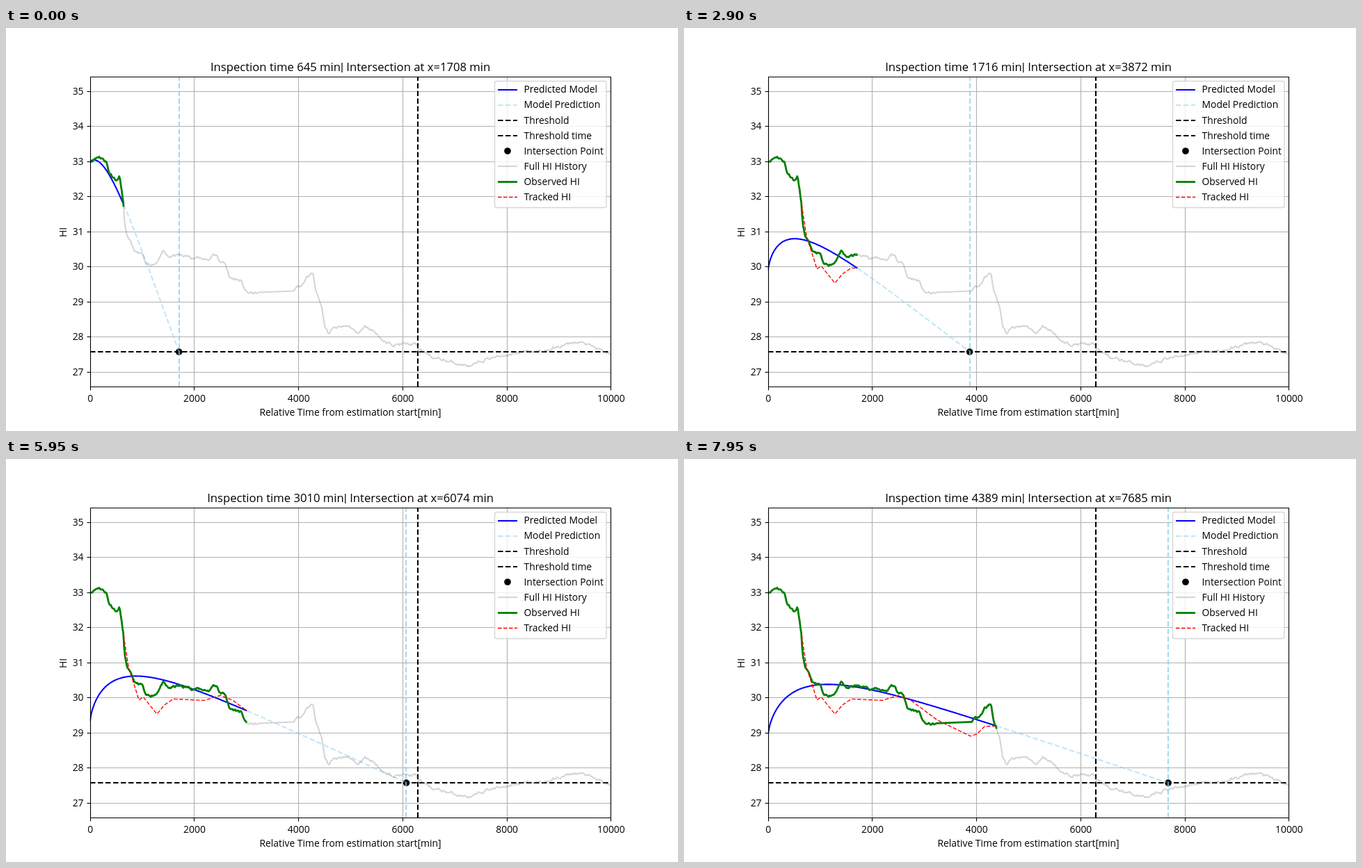
An HTML page with a canvas that plays this animation: 966 by 580 pixels, repeating every 8000 ms.

```html
<!DOCTYPE html>
<html lang="en">
<head>
<meta charset="utf-8">
<title>HI prediction</title>
<style>
html, body { margin: 0; width: 100%; height: 100%; overflow: hidden; background: #fff; }
canvas { display: block; }
</style>
</head>
<body>
<canvas id="c" width="966" height="580"></canvas>
<script>
const ctx = document.getElementById('c').getContext('2d');
const FONT = '"Open Sans", "Noto Sans", sans-serif';
const BOX = { l: 120.75, r: 869.4, t: 69.6, b: 516.2 };
const THRESHOLD = 27.57, THRESHOLD_TIME = 6295;
const STEP = 50, FRAMES = 160;
const GAP = { from: 3245, to: 3888, frame: 132 };
const SKY = a => `rgba(135,206,235,${a})`;
const GREY = 'rgba(128,128,128,.33)';

const px = x => BOX.l + x * (BOX.r - BOX.l) / 10000;
const py = v => 494.85 - (v - 27) * 50.5;
const crisp = x => Math.floor(x + 0.5) + 0.5;

function lerp(points, x) {
  let i = 1;
  while (i < points.length - 1 && points[i][0] < x) i++;
  const [x0, y0] = points[i - 1], [x1, y1] = points[i];
  const k = Math.min(1, Math.max(0, (x - x0) / (x1 - x0)));
  return y0 + (y1 - y0) * k;
}

// Turning points of the health indicator: minute, value
const trend = [
  [0, 33], [170, 33.15], [315, 33], [360, 32.7], [520, 32.45], [565, 32.6], [645, 31.77],
  [662, 31.2], [720, 30.83], [870, 30.4], [1005, 30.35], [1070, 30.02], [1260, 30.1],
  [1400, 30.43], [1500, 30.25], [1675, 30.33], [2300, 30.2], [2360, 30.35], [2445, 30.34],
  [2480, 30.15], [2605, 30.08], [2675, 29.68], [2890, 29.6], [3010, 29.25], [GAP.from, 29.23],
  [GAP.to, 29.29], [4110, 29.55], [4150, 29.72], [4280, 29.82], [4330, 29.35], [4450, 28.84],
  [4510, 28.33], [4585, 28.1], [4650, 28.23], [4980, 28.3], [5130, 28.09], [5280, 28.28],
  [5425, 28.2], [5700, 27.8], [6260, 27.78], [6300, 27.65], [6600, 27.4], [7325, 27.14],
  [7600, 27.36], [8200, 27.55], [8700, 27.58], [9300, 27.84], [9500, 27.81], [10000, 27.48]];

// Adds seeded, slowly wandering noise; the gap without samples stays straight
function roughen(points, step = 16) {
  let seed = 11, drift = 0;
  const random = () => (seed = seed * 16807 % 2147483647) / 2147483647;
  const out = [];
  for (let x = 0; x <= 10000; x += step) {
    drift = drift * 0.75 + (random() - 0.5) * 0.06;
    if (x < GAP.from || x > GAP.to) out.push([x, lerp(points, x) + drift]);
  }
  return out;
}
const history = roughen(trend);

// Model value at each inspection time
const tracked = [
  [645, 31.77], [740, 30.86], [830, 30.45], [940, 29.93], [1020, 30.02], [1285, 29.53],
  [1430, 29.79], [1600, 29.96], [2200, 29.92], [2500, 30.06], [2745, 29.92], [3240, 29.37],
  [GAP.to, 28.9], [4010, 28.96], [4160, 29.18], [4389, 29.19]];

// Where the model meets the threshold for each inspection time
const crossing = [
  [645, 1708], [930, 1570], [1091, 1763], [1716, 3872], [2291, 6146], [2560, 7500],
  [2707, 7900], [2745, 6793], [3240, 5450], [3905, 5813], [4290, 7800], [4389, 7685]];

const sampled = [[0, 645], [26, 1091], [58, 1716], [81, 2291], [105, 2745], [133, 3275], [159, 3759]];
const inspection = frame => Math.round(lerp(sampled, frame)) + (frame < GAP.frame ? 0 : 630);

const startValue = [[1763, 32.08], [2500, 30.8], [3872, 29.88], [6146, 29.3], [7685, 28.95]];

// y = y0 + c rise(x) - b x, through the inspection and crossing points
function fitModel(now, cross) {
  const y0 = lerp(startValue, cross) + Math.max(0, 1091 - now) * 0.00206;
  const tau = 240 + 0.043 * cross;
  const power = Math.max(0.75, 1.2 - 0.000115 * cross);
  const rise = x => 1 - Math.exp(-Math.pow(x / tau, power));
  const dNow = lerp(tracked, now) - y0, dCross = THRESHOLD - y0;
  const det = now * rise(cross) - cross * rise(now);
  const c = (now * dCross - cross * dNow) / det;
  const b = (rise(now) * dCross - rise(cross) * dNow) / det;
  return x => y0 + c * rise(x) - b * x;
}

const upTo = (points, x) => [...points.filter(p => p[0] < x), [x, lerp(points, x)]];

function sample(f, from, to, n = 160) {
  return Array.from({ length: n + 1 }, (_, i) => {
    const x = from + (to - from) * i / n;
    return [x, f(x)];
  });
}

// Dash lengths sit on half pixels
const dashes = width => [3.7, 1.6].map(k => Math.floor(k * width) + 0.5);

function stroke(points, color, width, dashed) {
  ctx.strokeStyle = color;
  ctx.lineWidth = width;
  ctx.lineJoin = 'round';
  ctx.setLineDash(dashed ? dashes(width) : []);
  ctx.beginPath();
  points.forEach(([x, y]) => ctx.lineTo(x, y));
  ctx.stroke();
  ctx.setLineDash([]);
}

const plot = (points, ...style) => stroke(points.map(([x, v]) => [px(x), py(v)]), ...style);

function dot(x, y) {
  ctx.fillStyle = '#000';
  ctx.beginPath();
  ctx.arc(x, y, 4.86, 0, 2 * Math.PI);
  ctx.fill();
}

function text(s, x, y, align = 'left', size = 13.89, family = FONT) {
  ctx.font = `${size}px ${family}`;
  ctx.textAlign = align;
  ctx.fillStyle = '#000';
  ctx.fillText(s, x, y);
  return ctx.measureText(s).width;
}

function drawTitle(now, cross) {
  const size = 16.67;
  const parts = [
    [`Inspection time ${now} min`, FONT],
    ['|', 'Roboto, sans-serif'],
    [` Intersection at x=${cross} min`, FONT]];
  const total = parts.reduce((w, [s, family]) => {
    ctx.font = `${size}px ${family}`;
    return w + ctx.measureText(s).width;
  }, 0);
  let x = (BOX.l + BOX.r) / 2 - total / 2;
  for (const [s, family] of parts) x += text(s, x, 61.5, 'left', size, family);
}

const ticksX = Array.from({ length: 6 }, (_, i) => i * 2000);
const ticksY = Array.from({ length: 9 }, (_, i) => 27 + i);

function drawGrid() {
  for (const v of ticksX) stroke([[crisp(px(v)), BOX.b], [crisp(px(v)), BOX.t]], '#b0b0b0', 1.11);
  for (const v of ticksY) stroke([[BOX.l, crisp(py(v))], [BOX.r, crisp(py(v))]], '#b0b0b0', 1.11);
}

function drawAxes() {
  const l = crisp(BOX.l), t = crisp(BOX.t), b = crisp(BOX.b);
  ctx.strokeStyle = '#000';
  ctx.lineWidth = 1.11;
  ctx.strokeRect(l, t, crisp(BOX.r) - l, b - t);
  for (const v of ticksX) {
    const x = crisp(px(v));
    stroke([[x, b], [x, b + 5]], '#000', 1.11);
    text(v, px(v) + 0.5, 538, 'center');
  }
  for (const v of ticksY) {
    const y = crisp(py(v));
    stroke([[l - 5, y], [l, y]], '#000', 1.11);
    text(v, 111.5, y + 4.8, 'right');
  }
  text('Relative Time from estimation start[min]', 495, 557.8, 'center');
  ctx.save();
  ctx.translate(87, 294);
  ctx.rotate(-Math.PI / 2);
  text('HI', 0, 0, 'center');
  ctx.restore();
}

const legend = [
  ['Predicted Model', '#00f', 2.08],
  ['Model Prediction', SKY(0.5), 2.08, true],
  ['Threshold', '#000', 2.08, true],
  ['Threshold time', '#000', 2.08, true],
  ['Intersection Point'],
  ['Full HI History', GREY, 2.08],
  ['Observed HI', '#008000', 2.78],
  ['Tracked HI', '#f00', 1.39, true]];

function drawLegend() {
  ctx.beginPath();
  ctx.roundRect(702.5, 76.5, 160.5, 182, 2.8);
  ctx.fillStyle = 'rgba(255,255,255,.8)';
  ctx.fill();
  ctx.strokeStyle = 'rgba(204,204,204,.8)';
  ctx.lineWidth = 1.39;
  ctx.stroke();
  legend.forEach(([label, color, width, dashed], i) => {
    const y = 88.6 + 22.1 * i;
    const line = Math.round(width) % 2 ? crisp(y) : Math.round(y);
    if (color) stroke([[707, line], [735, line]], color, width, dashed);
    else dot(721, y);
    text(label, 744.5, y + 4.7);
  });
}

function draw(frame) {
  const now = inspection(frame);
  const cross = Math.round(lerp(crossing, now));
  const model = fitModel(now, cross);
  const level = Math.round(py(THRESHOLD));
  const vline = (x, color) => stroke([[Math.round(px(x)), 516], [Math.round(px(x)), 70]], color, 2.08, true);

  ctx.fillStyle = '#fff';
  ctx.fillRect(0, 0, 966, 580);

  ctx.save();
  ctx.beginPath();
  ctx.rect(BOX.l, BOX.t, BOX.r - BOX.l, BOX.b - BOX.t);
  ctx.clip();
  drawGrid();
  dot(px(cross), py(THRESHOLD));
  plot(sample(model, 0, now), '#00f', 2.08);
  plot(sample(model, now, cross), SKY(0.5), 2.08, true);
  stroke([[121, level], [869, level]], '#000', 2.08, true);
  vline(THRESHOLD_TIME, '#000');
  vline(cross, SKY(0.75));
  plot(history, GREY, 2.08);
  plot(upTo(history, now), '#008000', 2.78);
  if (frame > 0) plot(upTo(tracked, now), '#f00', 1.39, true);
  ctx.restore();

  drawAxes();
  drawTitle(now, cross);
  drawLegend();
}

function tick() {
  draw(Math.floor(performance.now() / STEP) % FRAMES);
  requestAnimationFrame(tick);
}
tick();
</script>
</body>
</html>
```
